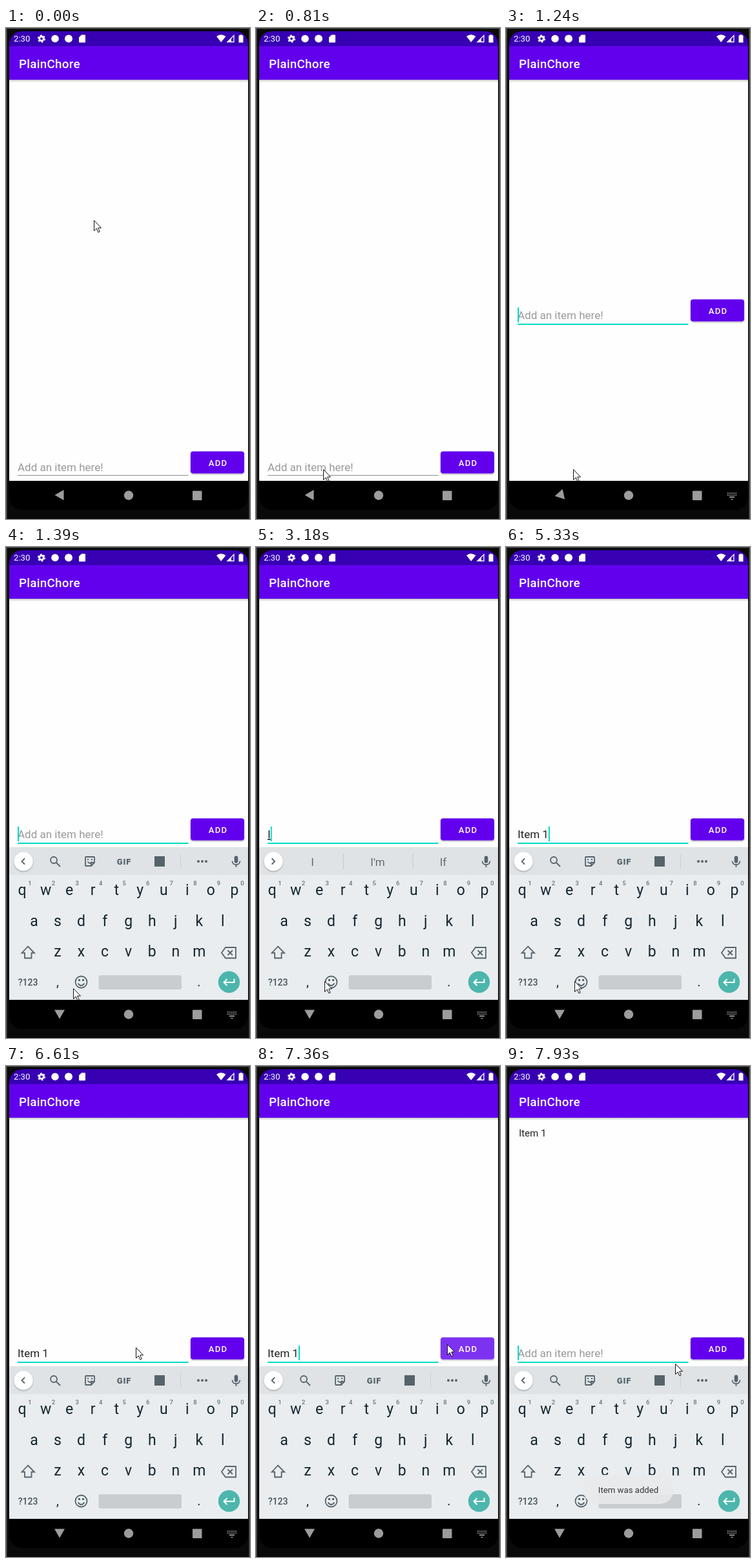
These frames come from a looping animation (378x759 px, 8 s). An HTML page:

```html
<!DOCTYPE html>
<html lang="en">
<head>
<meta charset="utf-8">
<title>To-do list</title>
<style>
  html, body { margin: 0; width: 100%; height: 100%; overflow: hidden; background: #0a0a0a; }
  svg { display: block; width: 378px; height: 759px; font-family: Roboto, sans-serif; }
  text { white-space: pre; }
  .mid { text-anchor: middle; }
  .med { font-weight: 500; }
  .line { fill: none; stroke: #56636a; stroke-width: 1.8; }
  .solid { fill: #56636a; }
  .nav { fill: #9c9c9c; }
</style>
</head>
<body>
<svg viewBox="0 0 378 759">
  <defs>
    <clipPath id="screen"><rect x="5" y="5" width="370" height="740" rx="20"/></clipPath>
    <linearGradient id="fade" x2="0" y2="1">
      <stop stop-color="#000" stop-opacity=".22"/><stop offset="1" stop-color="#000" stop-opacity="0"/>
    </linearGradient>
    <filter id="drop" x="-10%" y="-20%" width="120%" height="150%">
      <feDropShadow dx="0" dy="1.2" stdDeviation="1.1" flood-opacity=".35"/>
    </filter>
  </defs>

  <rect width="378" height="759" fill="#0a0a0a"/>
  <path d="M.75 0V759M377.25 0V759M0 .5H378" stroke="#555" stroke-width="1.5"/>

  <g clip-path="url(#screen)">
    <rect x="5" y="5" width="370" height="740"/>
    <rect x="5" y="80" width="370" height="620" fill="#fefefe"/>
    <rect x="5" y="5" width="370" height="23" fill="#3700b3"/>
    <rect x="5" y="28" width="370" height="52" fill="#6200ee"/>
    <rect x="5" y="80" width="370" height="4" fill="url(#fade)"/>

    <g id="status" fill="#fff">
      <text x="12" y="21" font-size="13.2">2:30</text>
      <circle cx="55" cy="16.5" r="3.3" fill="none" stroke="#fff" stroke-width="2.8"/>
      <circle cx="55" cy="16.5" r="5.2" fill="none" stroke="#fff" stroke-width="1.8" stroke-dasharray="2.7 2.745"/>
      <circle cx="76" cy="16.5" r="5.8"/>
      <circle cx="97" cy="16.5" r="6"/>
      <path d="M117 10.5H122Q123 10.5 123 11.5V21.5Q123 22.500 122 22.500H114Q113 22.500 113 21.500V14.500Z"/>
      <path d="M326 13Q333 7.500 340.500 13L333.200 22Z"/>
      <path d="M353 11.500V21.500H343Z" fill="none" stroke="#fff" stroke-width="1.300"/>
      <path d="M343 21.500L349 15.500V21.500Z"/>
      <path d="M362 10.500H366V11.500H367.500V22.500H360.500V11.500H362Z"/>
    </g>
    <text x="20" y="61.500" class="med" font-size="18.850" letter-spacing=".24" fill="#fff">PlainChore</text>
    <text id="item" x="20" y="109" font-size="15.070" fill="#212121">Item 1</text>

    <g id="form">
      <text id="hint" x="18" y="685" font-size="17" fill="#999">Add an item here!</text>
      <text id="entry" x="18" y="685" font-size="17" fill="#212121"></text>
      <rect id="rule" x="18"  width="264.500"/>
      <rect id="caret" y="667" width="2" height="23" fill="#03dac5"/>
      <rect id="button" x="286" y="654.500" width="83" height="34" rx="4" filter="url(#drop)"/>
      <text x="328.500" y="676.500" class="mid med" font-size="13.200" letter-spacing="1.180" fill="#fff">ADD</text>
    </g>

    <g id="keyboard">
      <rect x="5" y="464" width="370" height="236" fill="#e9edf0"/>
      <rect x="5" y="464" width="370" height="43" fill="#dfe3e6"/>
      <circle cx="27" cy="486" r="14.500" fill="#fff" filter="url(#drop)"/>
      <path id="chevron" class="line" d="M29 481.500L24.500 486L29 490.500"/>
      <g id="tools">
        <circle class="line" cx="74" cy="484" r="5"/>
        <path class="line" d="M77.500 487.500L84 494" stroke-width="2.200"/>
        <path class="line" d="M124 479H136Q137 479 137 480V488L132 493H124Q123 493 123 492V480Q123 479 124 479ZM126.500 486.500Q130 491 133.500 486.500M137 488H132V493"/>
        <path class="solid" d="M126 482h2v2h-2zM132 482h2v2h-2z"/>
        <text x="183" y="490.500" class="mid solid" font-size="13" font-weight="900" letter-spacing=".8">GIF</text>
        <rect class="solid" x="230" y="478" width="16" height="16"/>
        <path d="M270.500 475V497" stroke="#cbd0d3"/>
        <path d="M298 486h.01M304 486h.01M310 486h.01" class="line" style="stroke-width:4;stroke-linecap:round"/>
      </g>
      <g id="words" font-size="17" fill="#5f6b71" class="mid">
        <path d="M135.500 474V498M243 474V498" stroke="#c3c9cc"/>
        <text x="87.500" y="492.500"></text><text x="188.500" y="492.500"></text><text x="290" y="492.500"></text>
      </g>
      <rect class="solid" x="353.700" y="477.500" width="5.600" height="11" rx="2.800"/>
      <path class="line" d="M350.500 485.500Q351 491 356.500 491T362.500 485.500M356.500 491V495"/>
      <g id="keys" class="mid" fill="#14262f"></g>
      <path class="line" d="M34 617.500L44 627.500H39.500V635.500H29V627.500H24.500Z"/>
      <path class="line" d="M340 619H356V635.500H340L334 627.200ZM343.500 623.500L351 631M351 623.500L343.500 631"/>
      <text x="34" y="678" class="mid med" font-size="14" fill="#47545b">?123</text>
      <circle class="line" cx="116.500" cy="672.500" r="9"/>
      <path class="line" d="M111.500 674.500Q116.500 681.500 121.500 674.500"/>
      <path class="solid" d="M112 668h3v3h-3zM118 668h3v3h-3z"/>
      <rect x="143.500" y="662" width="128.500" height="22" rx="3" fill="#c9cdd0"/>
      <circle cx="345.500" cy="672.500" r="16.700" fill="#4db6ac"/>
      <path d="M353.500 667.500V673H338M342.500 668L337.500 673L342.500 678" fill="none" stroke="#fff" stroke-width="1.900"/>
    </g>

    <g id="toast">
      <rect x="119" y="632" width="141" height="45" rx="22.500" fill="#e9eaeb"/>
      <text x="189.500" y="659.500" class="mid" font-size="13.200" fill="#1c1c1c">Item was added</text>
    </g>

    <path id="back" class="nav" d="M75.500 722L89.500 714V730Z"/>
    <circle class="nav" cx="190" cy="722.500" r="7.200"/>
    <rect class="nav" x="289" y="715.500" width="14.500" height="14.500" rx="1"/>
    <g id="switcher" stroke="#9c9c9c" stroke-width="1.700">
      <path d="M343 719.200H357M343 722.200H357" stroke-dasharray="1.700 1.400"/>
      <path d="M346 725.200H354M348.500 728.500H351.500"/>
    </g>
  </g>
  <path id="mouse" d="M.5 .5V16.500L4.300 13L6.800 18.800L9.200 17.800L6.700 12H11.500Z" fill="#fff" stroke="#111"/>
</svg>
<script>
const $ = id => document.getElementById(id);
const LOOP = 8000;

// [time, x, y] of the pointer tip
const pointer = [
  [0, 136, 297], [120, 133, 330], [260, 122, 412], [400, 107, 525], [530, 96, 622],
  [670, 98, 670], [810, 104, 682], [1660, 106, 671],
  [6190, 112, 652], [6320, 138, 588], [6470, 174, 500], [6610, 201, 435],
  [6730, 232, 410], [6850, 264, 402], [6970, 289, 415], [7090, 296, 430],
  [7660, 292, 436], [7800, 276, 450], [7930, 262, 460]
];
// [time, text, suggestions]
const typing = [
  [0, ""],
  [3180, "I", ["I", "I'm", "If"]],
  [3430, "It", ["It", "It's", "Its"]],
  [3700, "Ite", ["Ite", "Item", "Iter"]],
  [3980, "Item", ["Item", "Items", "Itemized"]],
  [5060, "Item "],
  [5330, "Item 1"],
  [7390, ""]
];
const blinks = [1120, 1660, 2190, 2620, 3180, 4380, 4910, 5730, 6190, 6610, 7090];

const at = (list, t) => list.findLast(step => step[0] <= t);
const show = (id, on) => $(id).style.display = on ? "" : "none";
const set = (id, attrs) => {
  for (const name in attrs) $(id).setAttribute(name, attrs[name]);
};

const label = (s, x, y, size, extra = "") =>
  `<text x="${x}" y="${y}" font-size="${size}" ${extra}>${s}</text>`;
const row = (letters, x, y) =>
  [...letters].map((c, i) => label(c, x + i * 36.55, y, 23)).join("");
$("keys").innerHTML =
  row("qwertyuiop", 25, 538) + row("asdfghjkl", 43.5, 586) + row("zxcvbnm", 80, 633) +
  label(",", 80, 679, 20) + label(".", 299, 679, 20) +
  [..."1234567890"].map((c, i) =>
    label(c, 37 + i * 36.55, 523, 9.5, 'class="med" fill="#66737a"')).join("");

function draw(t) {
  const focused = t >= 1120, raised = t >= 1240, open = t >= 1390;
  const [, text, words] = at(typing, t);
  const [, x, y] = at(pointer, t);

  set("mouse", { transform: `translate(${x} ${y})` });
  set("form", { transform: `translate(0 ${raised ? -235 : 0})` });
  set("rule", focused
    ? { y: 692, height: 2, fill: "#03dac5" }
    : { y: 691, height: 1, fill: "#8c8c8c" });
  set("button", { fill: t >= 7240 && t < 7660 ? "#7e33f1" : "#6200ee" });
  set("back", { transform: `rotate(${open ? -90 : raised ? -12 : 0} 83 722)` });

  $("entry").textContent = text;
  $("entry").style.textDecoration = words ? "underline" : "none";
  show("hint", !text);
  show("caret", blinks.filter(b => b <= t).length % 2);
  set("caret", { x: 18 + (text && $("entry").getComputedTextLength()) });

  show("keyboard", open);
  show("switcher", raised);
  show("tools", !words);
  show("words", words);
  if (words) $("words").querySelectorAll("text").forEach((el, i) => el.textContent = words[i]);
  set("chevron", { transform: words ? "rotate(180 26.75 486)" : "" });

  show("item", t >= 7390);
  set("toast", { opacity: t >= 7930 ? 0.88 : t >= 7800 ? 0.4 : 0 });
}

const start = performance.now();
function tick() {
  draw((performance.now() - start) % LOOP);
  requestAnimationFrame(tick);
}
tick();
</script>
</body>
</html>
```
